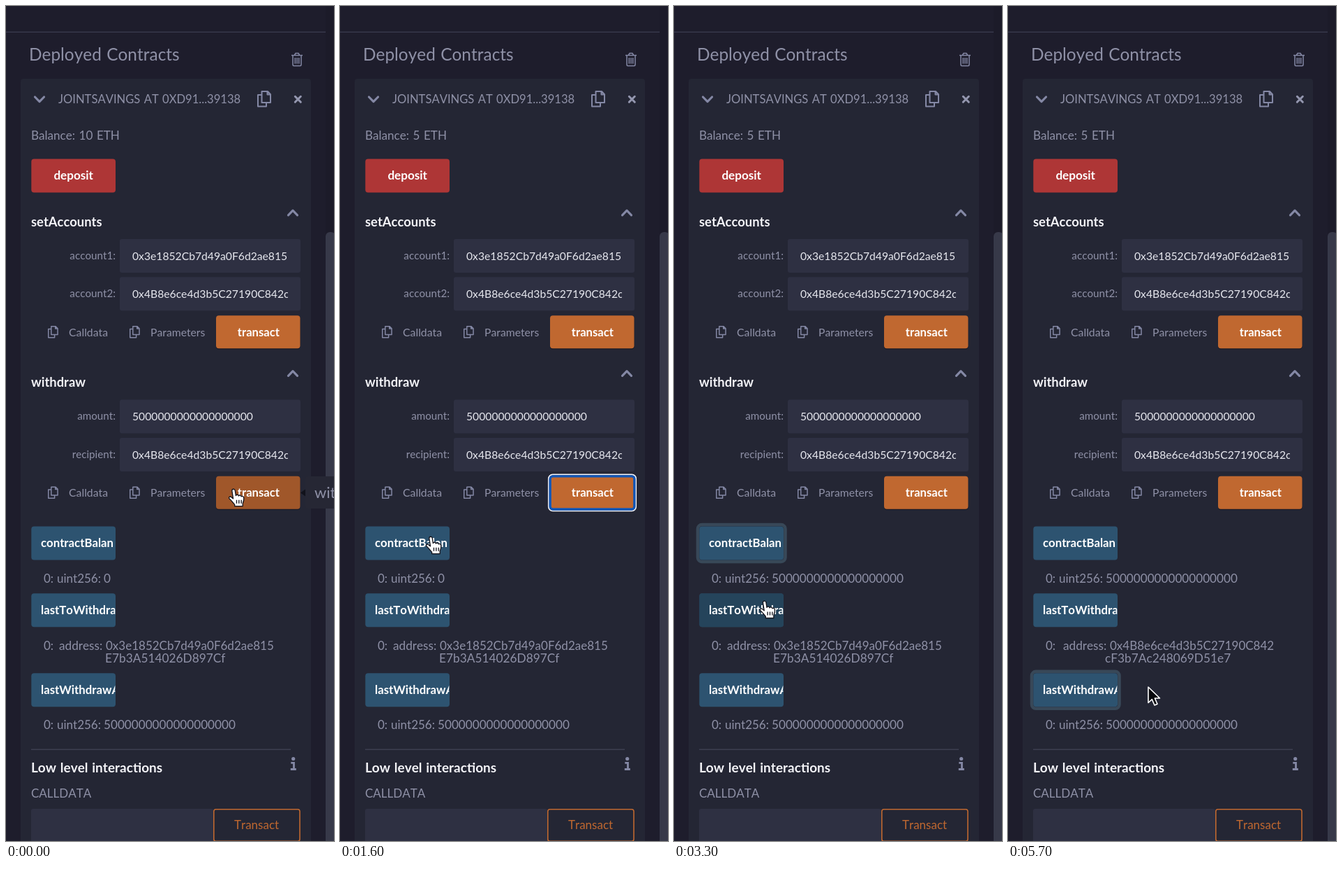
These frames come from a looping animation (470 px wide and 1193 px high, 5800 ms). An HTML page:

```html
<!DOCTYPE html>
<html lang="en">
<head>
<meta charset="utf-8">
<title>Deployed Contracts</title>
<style>
html, body { margin: 0; width: 100%; height: 100%; overflow: hidden; background: #1e1d2c; }
svg { display: block; }
#stage {
  position: absolute; left: 0; top: 0;
  font-family: Lato, "Open Sans", sans-serif; font-kerning: none; word-spacing: .07em;
}
</style>
</head>
<body>
<svg id="stage" width="470" height="1193" viewBox="0 0 470 1193"></svg>
<script>
const LOOP = 5800, STEP = 100;
const GREY = '#8f91a7', ICON = '#8488a5', FIELD = '#2e3042', ORANGE = '#c06830', BLUE = '#2d5370';
const ACCOUNT1 = ['0x3e1852Cb7d49a0F6d2ae815', 'E7b3A514026D897Cf'];
const ACCOUNT2 = ['0x4B8e6ce4d3b5C27190C842', 'cF3b7Ac248069D51e7'];
const AMOUNT = '5' + '0'.repeat(18);

const stage = document.getElementById('stage');
const $ = id => document.getElementById(id);

// Static drawing helpers; text is placed by its vertical centre.
const text = (x, cy, size, str, o = {}) =>
  `<text ${o.id ? `id="${o.id}"` : ''} x="${x}" y="${cy + size * 0.355}" font-size="${size}" fill="${o.fill || GREY}"
    font-weight="${o.bold ? 700 : 400}" text-anchor="${o.anchor || 'start'}">${str}</text>`;
const rect = (x, y, w, h, fill, r = 3, extra = '') =>
  `<rect x="${x}" y="${y}" width="${w}" height="${h}" rx="${r}" fill="${fill}" ${extra}/>`;
const line = (d, color, w, extra = '') =>
  `<path d="${d}" fill="none" stroke="${color}" stroke-width="${w}" ${extra}/>`;
const clip = (x, y, w, h, body) =>
  `<svg x="${x}" y="${y}" width="${w}" height="${h}" overflow="hidden">${body}</svg>`;
const copyIcon = (x, y, s) => `<g transform="translate(${x} ${y}) scale(${s})">` +
  line('M6.5 1H15l4 4.2V17H6.5zM14.5 1v4.5H19M6.5 6H1v16.5h12V17', ICON, 2, 'stroke-linejoin="round"') + '</g>';
const chevron = (x, y, dir) =>
  line(`M${x - 6.5} ${y - 3.3 * dir}l6.5 ${6.6 * dir}l6.5 ${-6.6 * dir}`, ICON, 3.2, 'stroke-linecap="round" stroke-linejoin="round"');

const field = (cy, label, value) =>
  text(157, cy - 0.5, 15.2, label, { anchor: 'end' }) + rect(163, cy - 24, 259, 48, FIELD) +
  clip(163, cy - 24, 241, 48, text(18, 24, 15.7, value, { fill: '#e6e7ee' }));

const actions = (cy, id) =>
  copyIcon(60, cy - 9, 0.74) + text(90, cy, 15.8, 'Calldata') +
  copyIcon(177, cy - 9, 0.74) + text(207, cy, 15.7, 'Parameters') +
  rect(301, cy - 23, 120.5, 47.5, '#191a26', 4) +
  rect(301, cy - 23.7, 120.5, 47, ORANGE, 4, `id="${id}"`) +
  text(361.8, cy, 16.6, 'transact', { fill: '#fff', bold: 1, anchor: 'middle' });

const calls = [
  { y: 743.5, label: 'contractBalan', tip: 'contractBalance', over: [1600, 2900], show: [1700, 2800], ring: [2200, 3600] },
  { y: 839.3, label: 'lastToWithdra', tip: 'lastToWithdraw', over: [3200, 4250], show: [3350, 4250], ring: [3600, 5000] },
  { y: 953.3, label: 'lastWithdrawA', tip: 'lastWithdrawAmount', over: [4500, 5250], show: [4550, 5250], ring: [5000, 5800] }
];

const callButton = (c, i) =>
  rect(34, c.y - 2.5, 125.5, 53, 'none', 6, `id="ring${i}" stroke="#384858" stroke-width="4.5"`) +
  rect(36.3, c.y, 120.7, 48, BLUE, 4) +
  rect(36.3, c.y, 120.7, 48, '#223d51', 4, `id="over${i}"`) +
  clip(36, c.y, 120.3, 48, text(14, 23.6, 16.75, c.label, { fill: '#fff', bold: 1 }));

const callTip = (c, i) => `<g id="tip${i}">` +
  `<path d="M147 ${c.y + 24}l7 -5v10z" fill="#171925"/>` +
  rect(154, c.y + 11, 264, 46, '#242634', 4) +
  text(163.5, c.y + 34.5, 21.95, c.tip + ' - call') + '</g>';

const result = (cy, id, value) =>
  text(54, cy, 17, '0:') + text(73, cy, 17, 'uint256:') + text(140, cy, 17.15, value, { id });

const addressLines = (id, x, pair) => `<g id="${id}">` +
  text(x[0], 914, 17.2, 'address:') + text(x[1], 914, 17, pair[0]) + text(x[2], 932, 17.3, pair[1]) + '</g>';

stage.innerHTML =
  rect(0, 0, 470, 1193, '#1e1d2c', 0) +
  rect(458, 0, 12, 1193, '#1c1b29', 0) +
  line('M0 37.3H458', '#37384b', 1.4) +
  rect(458, 323, 14, 890, '#373949', 6) +
  text(33, 69.5, 24.4, 'Deployed Contracts') +
  line('M409 70.5H425M413.5 70l1.5 -2.5h4l1.5 2.5M411 71V84q0 1.5 1.5 1.5h9q1.5 0 1.5 -1.5V71M414.3 74v8.5M417 74v8.5M419.7 74v8.5', ICON, 1.5) +
  rect(21, 104, 416, 1100, '#242634', 4) +
  chevron(48, 133.3, 1) +
  text(75, 133, 16.6, 'JOINTSAVINGS AT 0XD91...39138') +
  copyIcon(360, 121, 1) +
  line('M414.3 129.3l8 8m0 -8l-8 8', '#9396ae', 3, 'stroke-linecap="round"') +
  text(36, 184.5, 17.1, '', { id: 'balance' }) +
  rect(36.3, 218.5, 120.7, 48, '#ae3636', 4) +
  text(96.7, 242, 17.1, 'deposit', { fill: '#fff', bold: 1, anchor: 'middle' }) +
  text(36, 308, 18.4, 'setAccounts', { fill: '#f4f4f8', bold: 1 }) + chevron(411, 295.5, -1) +
  field(357, 'account1:', ACCOUNT1.join('')) +
  field(411.3, 'account2:', ACCOUNT2.join('')) +
  actions(466, 'send1') +
  text(36, 537.5, 18.4, 'withdraw', { fill: '#f4f4f8', bold: 1 }) + chevron(411, 525, -1) +
  field(586.5, 'amount:', AMOUNT) +
  field(641, 'recipient:', ACCOUNT2.join('')) +
  actions(695.5, 'send2') +
  '<g id="focus">' +
  rect(298.8, 669.4, 125.4, 52, 'none', 6, 'stroke="#f2f4fa" stroke-width="1.7"') +
  rect(301.2, 671.8, 120.6, 47.2, 'none', 4, 'stroke="#1257b8" stroke-width="3.3"') + '</g>' +
  '<g id="sendTip"><path d="M422 695.5l7 -5v10z" fill="#11121b"/>' +
  rect(429, 672, 50, 46, '#262734', 4) + text(442, 695, 21.95, 'withdraw - transact') + '</g>' +
  calls.map(callButton).join('') +
  result(817.5, 'total', '0') +
  text(54, 914, 17, '0:') +
  addressLines('addr1', [76, 143, 142], ACCOUNT1) +
  addressLines('addr2', [79, 146, 139], ACCOUNT2) +
  result(1027, 'last', AMOUNT) +
  line('M36 1062.3H408', '#3c3e50', 1.4) +
  text(36, 1088, 19, 'Low level interactions', { fill: '#f4f4f8', bold: 1 }) +
  `<circle cx="411.7" cy="1075.5" r="2.6" fill="${ICON}"/>` +
  line('M408.3 1081.3h4.2v9M407.8 1090.5h8', ICON, 2.8) +
  text(36, 1124.5, 17, 'CALLDATA') +
  rect(36, 1147, 261, 60, FIELD) +
  rect(297.8, 1147.8, 123.2, 45.5, 'none', 3, `stroke="${ORANGE}" stroke-width="1.6"`) +
  text(359, 1170, 17, 'Transact', { fill: ORANGE, anchor: 'middle' }) +
  calls.map(callTip).join('') +
  `<g id="hand"><g transform="scale(1.12)" stroke="#14141c" stroke-width="1.2" stroke-linejoin="round">
    <path fill="#fff" transform="translate(-7 -1)" d="M5 3.2C5 .6 8.6 .6 9 3l1 6.5c.4-1.6 3.2-1.6 3.6.4.8-1.4 3-1 3.4.8 1-1 3-.3 3.2 1.6.3 3-.4 5-1.4 7.2V23H8.5v-2C6.5 18.5 3.5 15 1.6 13.2.4 11.6 2.5 10 4.2 11.4L6.6 13.4z"/>
    <path d="M4 14v4.5M7 14v4.5M10 14v4.5"/></g></g>
  <path id="arrow" fill="#08080c" stroke="#fff" stroke-width="1.6" stroke-linejoin="round"
    d="M0 0V22.5L5.3 17.6 9 26l4-1.8L9.4 16H16.5z"/>`;

// Pointer stops: time, x, y
const stops = [
  [0, 326, 690], [100, 326, 690], [300, 335, 694], [1000, 335, 694], [1600, 130, 758],
  [2000, 115, 768], [2600, 115, 771], [2900, 103, 798], [3500, 139, 868], [4100, 139, 868],
  [4600, 129, 979], [5000, 129, 979], [5600, 201, 973], [LOOP, 201, 973]
];
const buttons = [[301, 671, 121], ...calls.map(c => [36, c.y, 121])];

const clamp = v => Math.max(0, Math.min(1, v));
const within = (t, [a, b]) => t >= a && t < b;
const fade = (t, [a, b]) => Math.min(clamp((t - a) / 150), 1 - clamp((t - b) / 150));
const mix = (a, b, k) => `rgb(${a.map((v, i) => Math.round(v + (b[i] - v) * k))})`;
const show = (id, on) => $(id).setAttribute('opacity', +on);

function pointer(t) {
  const i = stops.findIndex(s => s[0] > t);
  const [t0, x0, y0] = stops[i - 1], [t1, x1, y1] = stops[i];
  const u = (t - t0) / (t1 - t0), k = u * u * (3 - 2 * u);
  return [x0 + (x1 - x0) * k, y0 + (y1 - y0) * k];
}

function draw(t) {
  const [x, y] = pointer(t);
  const onButton = buttons.some(([bx, by, w]) => x >= bx && x <= bx + w && y >= by && y <= by + 48);
  for (const id of ['hand', 'arrow']) $(id).setAttribute('transform', `translate(${x} ${y})`);
  show('hand', onButton);
  show('arrow', !onButton);

  const sendOver = fade(t, [-500, 1150]);
  const dark = within(t, [600, 800]) ? [151, 80, 36] : [160, 87, 42];
  $('send2').setAttribute('fill', mix([192, 104, 48], dark, sendOver));
  show('sendTip', sendOver);
  show('focus', within(t, [600, 2200]));

  calls.forEach((c, i) => {
    show('over' + i, fade(t, c.over));
    show('tip' + i, fade(t, c.show));
    show('ring' + i, within(t, c.ring));
  });

  const paid = t >= 1300;
  $('balance').textContent = `Balance: ${paid ? 5 : 10} ETH`;
  $('balance').setAttribute('transform', `translate(0 ${paid ? 0.7 : 0})`);
  $('total').textContent = t >= 2300 ? AMOUNT : '0';
  show('addr1', t < 3700);
  show('addr2', t >= 3700);
}

const start = performance.now();
function tick() {
  const t = (performance.now() - start) % LOOP;
  draw(Math.floor(t / STEP) * STEP);
  requestAnimationFrame(tick);
}
draw(0);
requestAnimationFrame(tick);
</script>
</body>
</html>
```
